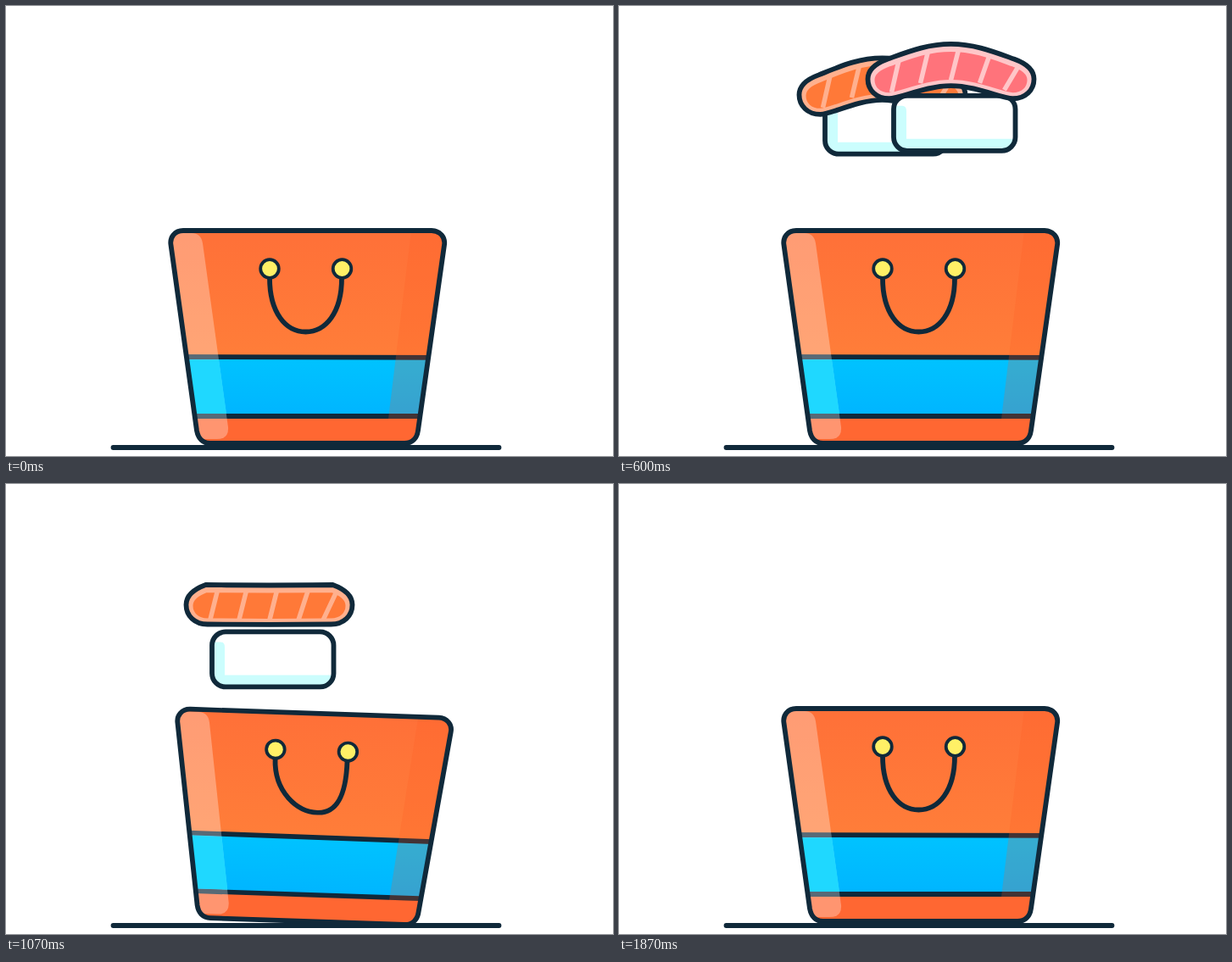
An HTML page for the animation above (1940 ms loop, 716 px wide and 531 px high).

```html
<!DOCTYPE html>
<html lang="en">
<head>
<meta charset="utf-8">
<title>Sushi bag</title>
<style>
  html, body { margin: 0; width: 100%; height: 100%; overflow: hidden; background: #fff; }
  svg { display: block; width: 716px; height: 531px; }
  .ink { fill: none; stroke: #10293a; stroke-width: 5.8; stroke-linecap: round; stroke-linejoin: round; }
</style>
</head>
<body>
<svg viewBox="0 0 716 531">
  <defs>
    <linearGradient id="orange" x1="0" y1="0" x2="0" y2="1">
      <stop offset="0" stop-color="#ff7038"/>
      <stop offset=".58" stop-color="#ff7d39"/>
      <stop offset=".87" stop-color="#ff7436"/>
      <stop offset=".88" stop-color="#ff6732"/>
    </linearGradient>
    <linearGradient id="blue" x1="0" y1="0" x2="0" y2="1">
      <stop offset="0" stop-color="#00c3ff"/>
      <stop offset="1" stop-color="#00b5ff"/>
    </linearGradient>
    <clipPath id="bagClip"><use href="#bagShape"/></clipPath>
    <path id="bagShape" d="M209 265H502C512 265 518.500 273 517 282L486 501C485 510 479 516 470 516H241C232 516 226.500 510 225 501L194.500 282C193 273 199 265 209 265Z"/>
  </defs>

  <g id="sushi"></g>

  <path class="ink" d="M126.500 521H581.500"/>
  <g id="bag">
    <use href="#bagShape" fill="url(#orange)"/>
    <g clip-path="url(#bagClip)">
      <rect x="190" y="414" width="330" height="70" fill="url(#blue)"/>
      <path class="ink" d="M190 414L520 415M190 484H520"/>
      <path d="M194 268H219Q230 268 232 280L262 497Q263 511 249 511H225Z" fill="#fff" opacity=".3"/>
      <path d="M212 417.500H251L260 481H220Z" fill="#1fd8ff"/>
      <path d="M478 266H522L488 487H451Z" fill="#ff5a22" opacity=".21"/>
    </g>
    <use href="#bagShape" class="ink"/>
    <path id="rope" class="ink"/>
    <g fill="#fff066" stroke="#10293a" stroke-width="3.800">
      <circle cx="311" cy="310" r="10.800"/>
      <circle cx="396.500" cy="310" r="10.800"/>
    </g>
  </g>
</svg>
<script>
const LOOP = 1940, STEP = 200 / 3;
const $ = id => document.getElementById(id);
const clamp = (v, lo, hi) => Math.min(hi, Math.max(lo, v));
const smooth = p => (1 - Math.cos(Math.PI * clamp(p, 0, 1))) / 2;

// Eased interpolation through [time, value] pairs
function keys(t, points) {
  let [t0, v0] = points[0];
  for (const [t1, v1] of points) {
    if (t < t1) return v0 + (v1 - v0) * smooth((t - t0) / (t1 - t0));
    [t0, v0] = [t1, v1];
  }
  return v0;
}

// Top and bottom x of each stripe, relative to the middle of the slice
const STRIPES = [[-60, -70], [-26, -36], [10, 0], [47, 34], [82, 63]];
const pieces = [
  { id: "salmon", x: 310.5, riceDrop: 3, sliceDrop: 2, delay: 4 * STEP, flesh: "#ff7938", fat: "#ffb08e" },
  { id: "tuna", x: 391.5, riceDrop: 0, sliceDrop: 0, delay: 0, flesh: "#ff737b", fat: "#ffc6c8" }
];

$("sushi").innerHTML = pieces.map(p => `
  <g id="${p.id}">
    <g id="${p.id}-rice">
      <rect x="-67.500" width="143.500" height="65" rx="16" fill="#fff"/>
      <path transform="translate(-67.500)" fill="#cbfdfd"
        d="M0 12H10Q15 12 15 18V51H143Q141 65 127 65H16Q0 65 0 49Z"/>
      <rect x="-67.500" width="143.500" height="65" rx="16" class="ink"/>
    </g>
    <g id="${p.id}-slice">
      <clipPath id="${p.id}-clip"><path id="${p.id}-edge"/></clipPath>
      <g clip-path="url(#${p.id}-clip)" fill="none" stroke="${p.fat}">
        <use href="#${p.id}-edge" fill="${p.flesh}" stroke="none"/>
        <path id="${p.id}-stripes" stroke-width="5.500"/>
        <use href="#${p.id}-edge" y="1" stroke-width="16"/>
      </g>
      <use href="#${p.id}-edge" class="ink"/>
    </g>
  </g>`).join("");

function slicePath(bend) {
  const top = -22.5 - bend, low = 24 - bend * .85;
  return `M-75 -22.500C-50 ${-22.5 - bend * .5} -28 ${top} 0 ${top}
    S50 ${-22.5 - bend * .5} 75 -22.500C90 -17 98 -10 98 1
    C98 14 88 24 73 24C60 24 30 ${low} 0 ${low}S-60 24 -73 24
    C-88 24 -98 14 -98 1C-98 -10 -90 -17 -75 -22.500Z`;
}

function stripePath(bend) {
  const lift = x => -bend * (1 - (x / 78) ** 2);
  return STRIPES.map(([a, b]) =>
    `M${a} ${-20 + lift(a)}L${b} ${20 + lift(b)}`).join("");
}

function riceY(t) {
  return t < 495 ? 97 + 26 * ((495 - t) / 225) ** 3 : 97 + .0008 * (t - 495) ** 2;
}

// The slice rides on the rice going up and trails it coming down
function sliceY(t) {
  if (t > 560) return 83 + 56.5 * ((t - 560) / 240) ** 1.8;
  return Math.min(83 + 39.5 * ((560 - t) / 290) ** 3, riceY(t) + 1);
}

function drawPiece(p, time) {
  const t = time - p.delay;
  const visible = t > 0 && t < 1110;
  $(p.id).setAttribute("visibility", visible ? "visible" : "hidden");
  if (!visible) return;
  const bend = 20 - 24 * smooth((t - 530) / 360);
  const place = (part, y) =>
    $(`${p.id}-${part}`).setAttribute("transform", `translate(${p.x} ${y})`);
  place("rice", riceY(t) + p.riceDrop);
  place("slice", sliceY(t) + p.sliceDrop);
  $(`${p.id}-edge`).setAttribute("d", slicePath(bend));
  $(`${p.id}-stripes`).setAttribute("d", stripePath(bend));
}

function drawBag(t) {
  const hit = keys(t, [[933, 0], [1067, 1], [1200, 0], [1333, -1], [1467, 0]]);
  $("bag").setAttribute("transform", `translate(356 517) rotate(${1.95 * hit})
    scale(1 ${1 - .022 * Math.abs(hit)}) translate(-356 -517)`);
  const sway = keys(t, [[933, 0], [1067, 9.5], [1333, -9.5], [1533, 6], [1700, -3], [1867, 0]]);
  const sag = keys(t, [[1333, 0], [1467, 2], [1600, 2], [1867, 0]]);
  $("rope").setAttribute("d", `M311 321C311 362 ${330 + sway} ${384.5 + sag}
    ${353.5 + sway} ${384.5 + sag}S396 362 396 321`);
}

function render(ms) {
  // Fifteen poses a second, each starting on a whole hundredth
  let k = Math.floor(ms / STEP) + 1;
  while (Math.round(k * STEP / 10) * 10 > ms) k--;
  const t = Math.min(k, 28) * STEP;
  pieces.forEach(p => drawPiece(p, t));
  drawBag(t);
}

function tick() {
  render(performance.now() % LOOP);
  requestAnimationFrame(tick);
}
tick();
</script>
</body>
</html>
```
